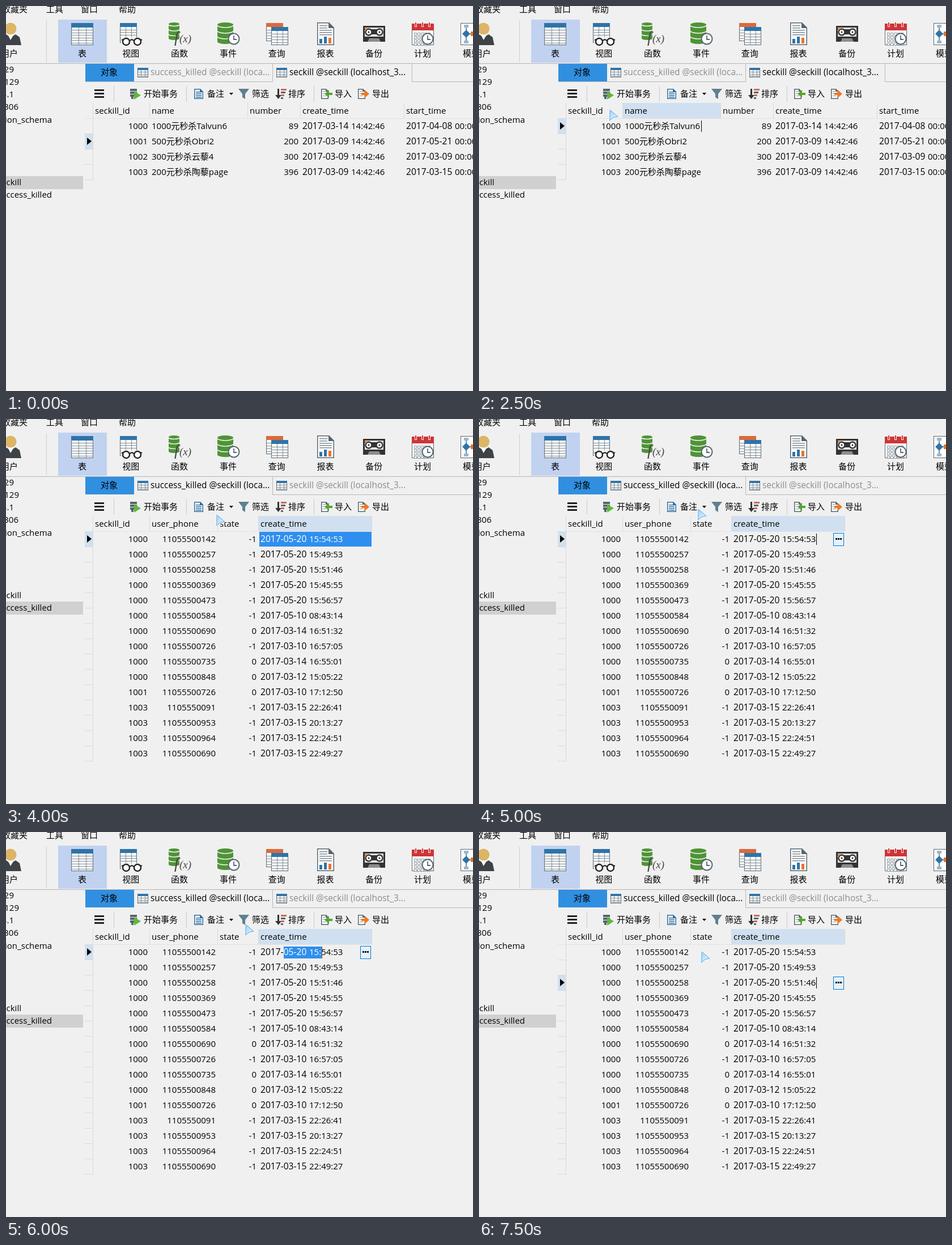
Animation, 824 px wide and 679 px high, one loop 8000 ms. Source, as an HTML page with a canvas:

```html
<!DOCTYPE html>
<html lang="zh">
<head>
<meta charset="utf-8">
<style>
html, body { margin: 0; width: 824px; height: 679px; overflow: hidden; background: #f0f0f0; }
canvas { display: block; }
</style>
</head>
<body>
<canvas id="stage" width="824" height="679"></canvas>
<script>
const ctx = document.getElementById('stage').getContext('2d');
const LOOP = 8000, ROW_H = 27, ROWS_TOP = 198;
const FONT = '"Open Sans", "Noto Sans CJK SC", "Noto Sans CJK", sans-serif';
const INK = '#000', GRAY = '#8c8c8c', BLUE = '#2f8fee', HILITE = '#d0e0f0';
const SLATE = '#56656f', STEEL = '#2f74a8', GREEN = '#4e9436', ORANGE = '#e8742a';

const items = {
  columns: [
    { name: 'seckill_id', x: 154, right: 250 },
    { name: 'name', x: 254 },
    { name: 'number', x: 427, right: 516 },
    { name: 'create_time', x: 520 },
    { name: 'start_time', x: 703 },
    { x: 900 }
  ],
  rows: [
    ['1000', '1000元秒杀Talvun6', '89', '2017-03-14 14:42:46', '2017-04-08 00:00:00'],
    ['1001', '500元秒杀Obri2', '200', '2017-03-09 14:42:46', '2017-05-21 00:00:00'],
    ['1002', '300元秒杀云藜4', '300', '2017-03-09 14:42:46', '2017-03-09 00:00:00'],
    ['1003', '200元秒杀陶藜page', '396', '2017-03-09 14:42:46', '2017-03-15 00:00:00']
  ]
};

const orders = {
  columns: [
    { name: 'seckill_id', x: 154, right: 250 },
    { name: 'user_phone', x: 254, right: 370 },
    { name: 'state', x: 374, right: 442 },
    { name: 'create_time', x: 446 },
    { x: 646 }
  ],
  rows: [
    ['1000', '11055500142', '-1', '2017-05-20 15:54:53'],
    ['1000', '11055500257', '-1', '2017-05-20 15:49:53'],
    ['1000', '11055500258', '-1', '2017-05-20 15:51:46'],
    ['1000', '11055500369', '-1', '2017-05-20 15:45:55'],
    ['1000', '11055500473', '-1', '2017-05-20 15:56:57'],
    ['1000', '11055500584', '-1', '2017-05-10 08:43:14'],
    ['1000', '11055500690', '0', '2017-03-14 16:51:32'],
    ['1000', '11055500726', '-1', '2017-03-10 16:57:05'],
    ['1000', '11055500735', '0', '2017-03-14 16:55:01'],
    ['1000', '11055500848', '0', '2017-03-12 15:05:22'],
    ['1001', '11055500726', '0', '2017-03-10 17:12:50'],
    ['1003', '1105550091', '-1', '2017-03-15 22:26:41'],
    ['1003', '11055500953', '-1', '2017-03-15 20:13:27'],
    ['1003', '11055500964', '-1', '2017-03-15 22:24:51'],
    ['1003', '11055500690', '-1', '2017-03-15 22:49:27']
  ]
};

const scenes = [
  { at: 0, table: items, row: 1 },
  { at: 500, table: items, row: 1, cursor: [493, 169] },
  { at: 1000, table: items, row: 0, col: 3, caret: 668, button: GRAY, cursor: [418, 182] },
  { at: 1500, table: items, row: 1, col: 3, caret: 668, button: GRAY, cursor: [411, 214], noArrow: true },
  { at: 2000, table: items, row: 1, col: 3, caret: 668, button: GRAY, cursor: [330, 198] },
  { at: 2500, table: items, row: 0, col: 1, caret: 392, cursor: [229, 182] },
  { at: 3000, table: orders, row: 9, col: 3, filled: true, cursor: [101, 262] },
  { at: 4000, table: orders, row: 0, col: 3, filled: true, cursor: [370, 168] },
  { at: 4500, table: orders, row: 0, col: 3, caret: 595, button: GRAY, cursor: [381, 162] },
  { at: 5000, table: orders, row: 0, col: 3, caret: 595, button: BLUE, cursor: [385, 158] },
  { at: 5500, table: orders, row: 0, col: 3, caret: 595, button: BLUE, cursor: [404, 160] },
  { at: 6000, table: orders, row: 0, col: 3, range: [490, 557], button: BLUE, cursor: [421, 162] },
  { at: 6500, table: orders, row: 0, col: 3, caret: 595, button: GRAY, cursor: [356, 190] },
  { at: 7000, table: orders, row: 1, col: 3, filled: true, cursor: [388, 183] },
  { at: 7500, table: orders, row: 2, col: 3, caret: 595, button: BLUE, cursor: [391, 210] }
];

function rect(x, y, w, h, color) {
  ctx.fillStyle = color;
  ctx.fillRect(x, y, w, h);
}
function frame(x, y, w, h, color, fill) {
  rect(x, y, w, h, color);
  rect(x + 1, y + 1, w - 2, h - 2, fill);
}
function poly(color, ...points) {
  ctx.fillStyle = color;
  ctx.beginPath();
  points.forEach(([x, y]) => ctx.lineTo(x, y));
  ctx.closePath();
  ctx.fill();
}
function line(color, width, ...points) {
  ctx.strokeStyle = color;
  ctx.lineWidth = width;
  ctx.beginPath();
  points.forEach(([x, y]) => ctx.lineTo(x, y));
  ctx.stroke();
}
function disc(x, y, r, fill, stroke, width = 2) {
  ctx.beginPath();
  ctx.arc(x, y, r, 0, Math.PI * 2);
  if (fill) { ctx.fillStyle = fill; ctx.fill(); }
  if (stroke) { ctx.strokeStyle = stroke; ctx.lineWidth = width; ctx.stroke(); }
}
// y is the vertical middle of the text line
function text(str, x, y, { color = INK, align = 'left', size = 15 } = {}) {
  ctx.font = `${size}px ${FONT}`;
  ctx.textAlign = align;
  ctx.fillStyle = color;
  ctx.fillText(str, x, y + 5);
}
function dateTime(str, x, y, color) {
  const [date, time] = str.split(' ');
  text(date, x, y, { color, size: 15.6 });
  text(time, x + 86, y, { color });
}

function sheet(x, y, w, h, head, cols, rows, headH) {
  frame(x, y, w, h, SLATE, '#fff');
  rect(x, y, w, headH, head);
  for (let i = 1; i < cols; i++) rect(Math.round(x + i * w / cols), y + headH, 1, h - headH, '#7c8a93');
  for (let i = 1; i < rows; i++) rect(x, Math.round(y + headH + i * (h - headH) / rows), w, 1, '#7c8a93');
}
function cylinder(x, y, w, h) {
  const ry = w / 7, cx = x + w / 2;
  const oval = cy => { ctx.beginPath(); ctx.ellipse(cx, cy, w / 2, ry, 0, 0, Math.PI * 2); };
  rect(x, y + ry, w, h - 2 * ry, GREEN);
  ctx.fillStyle = GREEN;
  oval(y + h - ry); ctx.fill();
  oval(y + ry); ctx.fill();
  ctx.strokeStyle = '#f0f0f0';
  ctx.lineWidth = 1.6;
  for (let i = 0; i < 3; i++) {
    ctx.beginPath();
    ctx.ellipse(cx, y + ry + 1 + i * (h - 2 * ry) / 3, w / 2, ry, 0, 0, Math.PI);
    ctx.stroke();
  }
}
function clock(x, y) {
  disc(x, y, 9.5, '#fff', SLATE, 2);
  line(SLATE, 1.8, [x, y - 6], [x, y + 1], [x + 5, y + 1]);
}
function page(x, y, w, h, fold, color) {
  poly(color, [x, y], [x + w - fold, y], [x + w, y + fold], [x + w, y + h], [x, y + h]);
  poly('#fff', [x + 1.5, y + 1.5], [x + w - fold - 1, y + 1.5], [x + w - fold - 1, y + fold + 1],
    [x + w - 1.5, y + fold + 1], [x + w - 1.5, y + h - 1.5], [x + 1.5, y + h - 1.5]);
}

function mainIcons() {
  // user
  poly('#3d4347', [-10, 69], [-8, 56], [0, 50], [8, 55], [17, 50], [24, 55], [27, 69]);
  poly('#fff', [3, 50], [14, 50], [8, 60]);
  disc(8, 40, 10.5, '#dcb567');
  // table
  sheet(115, 30, 39, 39, STEEL, 3, 7, 8);
  // view
  sheet(201, 30, 30, 35, STEEL, 3, 6, 7);
  rect(203, 55, 38, 15, '#f0f0f0');
  [212, 232].forEach(x => disc(x, 63, 6, '#fff', '#222', 2.4));
  line('#222', 2, [204, 60], [207, 59]);
  line('#222', 2, [218, 61], [222, 59], [226, 61]);
  line('#222', 2, [237, 59], [240, 60]);
  // function
  cylinder(287, 29, 19, 31);
  ctx.textAlign = 'left';
  ctx.fillStyle = '#444';
  ctx.font = 'italic 27px "Liberation Serif", serif';
  ctx.fillText('f', 297, 64);
  ctx.font = 'italic 19px "Liberation Serif", serif';
  ctx.fillText('(x)', 306, 64);
  // event
  cylinder(373, 29, 28, 38);
  clock(402, 58);
  // query
  sheet(459, 30, 30, 32, '#db6a3c', 3, 5, 7);
  sheet(468, 37, 30, 32, STEEL, 3, 5, 7);
  // report
  page(549, 29, 30, 40, 9, SLATE);
  for (let i = 0; i < 5; i++) rect(553, 34 + i * 4, i < 2 ? 14 : 22, 1.5, '#7d8990');
  rect(553, 58, 5, 8, STEEL);
  rect(561, 54, 5, 12, STEEL);
  rect(569, 56, 5, 10, ORANGE);
  // backup
  rect(630, 35, 39, 28, '#333');
  rect(633, 38, 33, 16, '#e9e9e9');
  rect(644, 41, 11, 9, '#333');
  [640, 659].forEach(x => { disc(x, 46, 5.5, '#fff', '#333', 2.4); disc(x, 46, 1.6, '#333'); });
  rect(633, 39, 4, 3, ORANGE);
  poly('#8d8d8d', [638, 63], [641, 57], [658, 57], [661, 63]);
  // schedule
  frame(716, 32, 39, 37, SLATE, '#fff');
  rect(716, 31, 39, 12, '#cf3437');
  [723, 735, 747].forEach(x => { rect(x - 2, 29, 4, 8, '#f0f0f0'); rect(x - 1, 29, 2, 7, '#cf3437'); });
  for (let y = 47; y < 66; y += 6)
    for (let x = 720; x < 750; x += 6) frame(x, y, 5, 5, '#909a9f', '#fff');
  clock(744, 58);
  // model
  frame(802, 30, 40, 39, SLATE, '#fff');
  line(SLATE, 1.5, [812, 36], [812, 64]);
  line(SLATE, 1.5, [812, 49], [824, 49]);
  poly(STEEL, [805, 49], [812, 42], [819, 49], [812, 56]);
  rect(808, 33, 8, 5, '#9ab7cc');
  rect(808, 61, 8, 5, '#9ab7cc');
  rect(820, 45, 6, 8, ORANGE);
}

function header() {
  text('收藏夹', 38, 6, { align: 'right' });
  [['工具', 71], ['窗口', 132], ['帮助', 199]].forEach(([s, x]) => text(s, x, 6));
  rect(71, 26, 1, 73, '#cfcfcf');
  rect(92, 24, 86, 76, '#c1d2f0');
  mainIcons();
  text('用户', 21, 84, { align: 'right' });
  ['表', '视图', '函数', '事件', '查询', '报表', '备份', '计划', '模型']
    .forEach((s, i) => text(s, 134.5 + i * 85.8, 84, { align: 'center' }));
  rect(0, 101, 824, 1, '#b4b4b4');
}

function sidebar(onOrders) {
  rect(0, onOrders ? 322 : 300, 136, 23, '#d0d0d0');
  [['129', 14, 112], ['.129', 23, 134], ['3.1', 14, 156], ['3306', 22, 178],
   ['information_schema', 81, 201], ['seckill', 27, 311], ['success_killed', 81, 333]]
    .forEach(([s, x, y]) => text(s, x, y, { align: 'right' }));
}

function tabs(onOrders) {
  const edge = '#b8b8b8';
  rect(140, 102, 86, 31, '#318fe0');
  text('对象', 182, 117, { align: 'center' });
  rect(470, 102, 1, 31, edge);
  if (onOrders) {
    rect(470, 133, 354, 1, edge);
  } else {
    rect(140, 133, 331, 1, edge);
    rect(716, 102, 1, 31, edge);
    rect(716, 133, 108, 1, edge);
  }
  sheet(232, 109, 19, 17, STEEL, 3, 4, 4);
  sheet(477, 109, 19, 17, STEEL, 3, 4, 4);
  text('success_killed @seckill (loca...', 255, 117, { size: 15.4, color: onOrders ? INK : GRAY });
  text('seckill @seckill (localhost_3...', 500, 117, { size: 15.4, color: onOrders ? GRAY : INK });
}

function transferIcon(x, color, outward) {
  page(x, 146, 13, 18, 4, SLATE);
  for (let y = 150; y < 162; y += 4) rect(x + 3, y, 6, 1, '#8a969d');
  const tip = outward ? x + 20 : x + 6, base = outward ? x + 12 : x + 14;
  poly(color, [tip, 155], [base, 148], [base, 162]);
  rect(outward ? x + 6 : x + 14, 153, 6, 4, color);
}

function toolbar() {
  [148, 154, 160].forEach(y => rect(156, y - 1, 17, 3, '#222'));
  [190, 318, 543].forEach(x => rect(x, 141, 1, 28, '#cbcbcb'));
  // transaction
  [146, 151, 156].forEach(y => rect(219, y, 12, 4, SLATE));
  rect(221, 160, 4, 4, SLATE);
  poly('#5fb83c', [226, 150], [238, 157.5], [226, 165]);
  // note
  page(332, 146, 16, 18, 5, '#2f6f9f');
  for (let y = 151; y < 163; y += 3) rect(335, y, 10, 1.5, '#2f6f9f');
  poly(INK, [394, 153], [401, 153], [397.5, 157]);
  // filter
  poly('#5f7f92', [410, 146], [429, 146], [422, 155], [422, 164], [417, 161], [417, 155]);
  // sort
  rect(479, 146, 3, 13, '#333');
  poly('#333', [475, 157], [486, 157], [480.5, 164]);
  [10, 8, 6, 4].forEach((w, i) => rect(485, 146 + i * 5, w, 3, i % 2 ? SLATE : '#cc6a5a'));
  transferIcon(556, '#55a52f', false);
  transferIcon(621, '#f07820', true);
  [['开始事务', 243], ['备注', 355], ['筛选', 434], ['排序', 498], ['导入', 580], ['导出', 646]]
    .forEach(([s, x]) => text(s, x, 155));
}

function grid({ table, row, col, filled, range, caret, button, noArrow }) {
  const { columns, rows } = table;
  const top = ROWS_TOP + row * ROW_H;
  const active = columns[col], next = columns[col + 1];
  const bottom = ROWS_TOP + rows.length * ROW_H;
  const rule = '#dadada';

  rect(139, 198, Math.min(824, columns.at(-1).x) - 139, 1, '#e2e2e2');
  if (active) rect(active.x, 171, next.x - active.x, 27, HILITE);
  columns.forEach(c => {
    rect(c.x - 1, 171, 1, 27, rule);
    if (c.name) text(c.name, c.x + 3, 185);
  });

  rect(139, top, 15, ROW_H, HILITE);
  rect(153, 198, 1, bottom - 198, rule);
  rows.forEach((_, i) => rect(139, ROWS_TOP + (i + 1) * ROW_H, 15, 1, rule));
  if (!noArrow) poly('#000', [143, top + 7], [151, top + 13.5], [143, top + 20]);
  if (filled) rect(active.x + 1, top + 1, next.x - active.x - 2, 26, BLUE);

  rows.forEach((cells, r) => cells.forEach((value, c) => {
    const { x, right } = columns[c], y = 212 + r * ROW_H;
    const color = filled && r === row && c === col ? '#fff' : INK;
    if (right) text(value, right, y, { align: 'right' });
    else if (value.includes(':')) dateTime(value, x + 3, y, color);
    else text(value, x + 3, y);
  }));

  if (range) {
    const [from, to] = range;
    ctx.save();
    ctx.beginPath();
    ctx.rect(from, top + 4, to - from, 21);
    ctx.clip();
    rect(from, top + 4, to - from, 21, BLUE);
    dateTime(rows[row][col], active.x + 3, top + 14, '#fff');
    ctx.restore();
    rect(to, top + 4, 1, 21, '#a05a20');
  }
  if (caret) rect(caret, top + 4, 1, 20, '#000');
  if (button) {
    const focused = button === BLUE;
    const x = next.x - 21;
    frame(x, top + 3, 19, 23, focused ? '#0078d7' : '#adadad', focused ? '#e5f1fb' : '#e1e1e1');
    [4, 8, 12].forEach(dx => rect(x + dx, top + 12, 3, 3, '#111'));
  }
}

function pointer([x, y]) {
  ctx.save();
  ctx.translate(x, y);
  const glow = ctx.createLinearGradient(0, 4, 14, 16);
  glow.addColorStop(0, '#a0d0f4');
  glow.addColorStop(1, '#e4f3ff');
  const shape = [[2, 1], [16, 13], [8.5, 14.5], [1.5, 20]];
  ctx.lineJoin = 'round';
  line('#fff', 3, ...shape, shape[0]);
  poly(glow, ...shape);
  line('#7fbcea', 1.4, ...shape, shape[0]);
  ctx.restore();
}

function draw(scene) {
  const onOrders = scene.table === orders;
  rect(0, 0, 824, 679, '#f0f0f0');
  header();
  sidebar(onOrders);
  tabs(onOrders);
  toolbar();
  grid(scene);
  if (scene.cursor) pointer(scene.cursor);
}

function tick() {
  const t = performance.now() % LOOP;
  draw(scenes.findLast(s => s.at <= t));
  requestAnimationFrame(tick);
}
tick();
</script>
</body>
</html>
```
